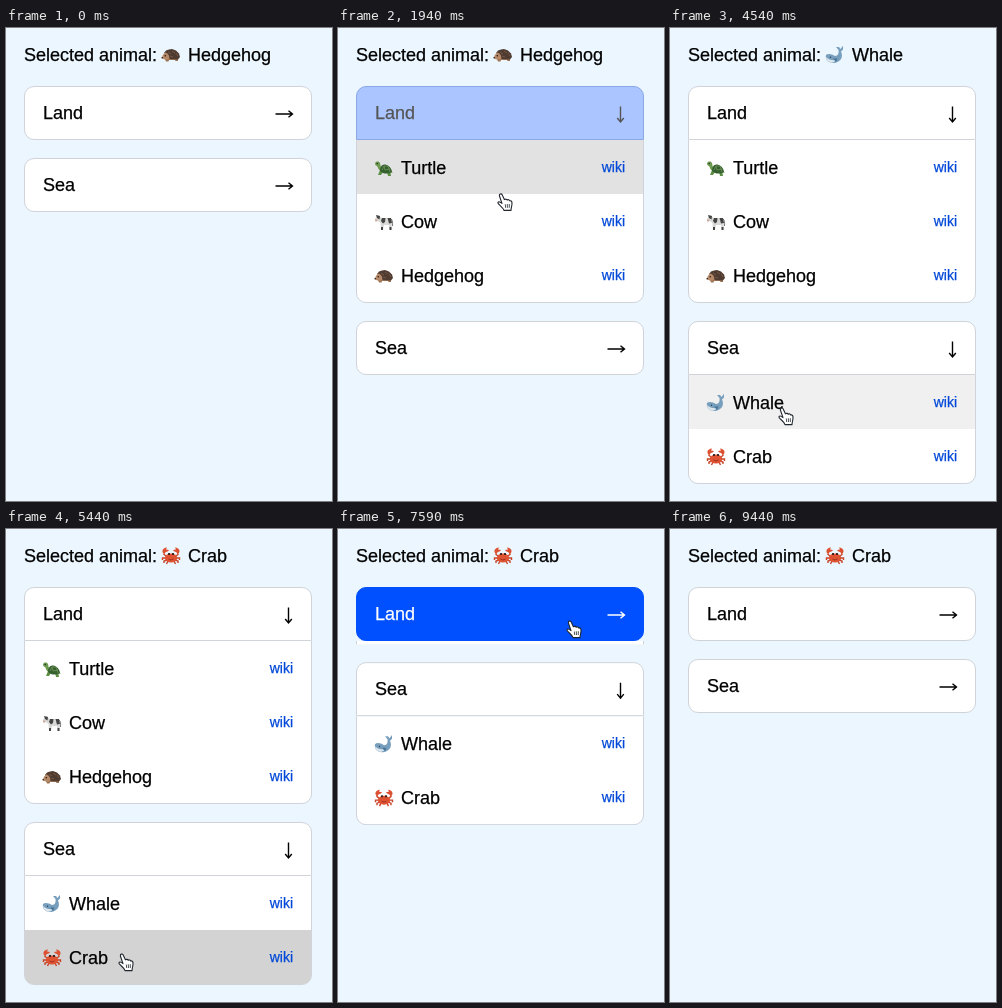
Recreate the animation shown at these times as an HTML page. Size 326 by 473 pixels, loop 9.69 s.

```html
<!DOCTYPE html>
<html lang="en">
<head>
<meta charset="utf-8">
<title>Animal picker</title>
<style>
  html, body { margin: 0; height: 100%; overflow: hidden; background: #ebf6ff; }
  svg { display: block; }
  text { font: 18px "Liberation Sans", Arial, sans-serif; stroke: #000; stroke-width: .25; }
  .wiki { font-size: 14px; fill: #0048d8; stroke: #0048d8; text-anchor: end; }
  .line { fill: none; stroke: #d0d4d9; }
  .arrow { fill: none; stroke-width: 1.4; }
</style>
</head>
<body>
<svg id="stage" width="326" height="473">
  <defs>
    <g id="Turtle">
      <path d="M6 12L4 17H7L9 14M13 13L14 18H17L16 12L19 15" fill="#5d8f45"/>
      <path d="M7 13C4 12 4 9 3 8C.5 7.500 .5 4 3 3.500C6 3 6.500 6 6.500 8L9 11Z" fill="#6c9b50"/>
      <path d="M6 13C6 9 8 6 11 6.500C15 7 18 11 18 14C14 16.500 9 16 6 13Z" fill="#35612f"/>
      <path d="M8 12L10 8L14 8L16 14M11 12L10 8M11 12L16 11" fill="none" stroke="#72945a" stroke-width=".8"/>
      <circle cx="3.200" cy="5.500" r=".7" fill="#222"/>
    </g>
    <g id="Cow">
      <path d="M4 3L8 6H16L18 8L17.500 18H15.500L15 13H10L9 18H7L6.500 11L4 9L1.500 9.500L.8 7Z" fill="#d9d9d7"/>
      <path d="M2 3L6 4L5.500 7.500L3 6ZM8 6H11.500L11 10L9 11.500L7 9ZM13.500 6H17L18 11L15 11.500ZM7 15H9V18H7ZM15.500 15H17.500V18H15.500Z" fill="#444"/>
      <path d="M17 7Q19 8 18.500 14" fill="none" stroke="#555" stroke-width=".8"/>
      <path d="M.8 7.500H3.500L3 9.500H1.300Z" fill="#d3a79e"/>
    </g>
    <g id="Hedgehog">
      <path d="M3 12H17L17 16H14.500L14 15H8L7.500 16.500H5Z" fill="#9b7355"/>
      <path d="M3 8L5 5.500L8 4.500L11 4L15 5.500L18 8.500L19 12L17 14.500L9 14Z" fill="#503b30"/>
      <path d="M7 7L10 9M11 6L14 8M15 8L17 11M9 11L12 12" stroke="#82634f" stroke-width=".7"/>
      <path d="M4 7.500C7 8 9 11 8 14C5 15.500 3 14.500 .7 13Q2 9 4 7.500Z" fill="#b68a68"/>
      <circle cx="4.300" cy="10.800" r=".8" fill="#201916"/>
      <circle cx="1.200" cy="12.700" r=".8" fill="#201916"/>
    </g>
    <g id="Whale">
      <path d="M1 10C3 8 7 9 10 11C13 11 14 8 13.500 5L11 2L14 2L15.500 4L18 .8L18 4.500L16 6.500C18.500 12 16 17 9 18C3 18.500 0 14 1 10Z" fill="#779fbd"/>
      <path d="M1 12C4 15 7 15.500 11 15Q9 18 6 17.700Q1 16 1 12Z" fill="#dde6ed"/>
      <path d="M8 13.500L11 17L12.500 13.500Z" fill="#4b7395"/>
      <circle cx="5.500" cy="12.300" r=".7" fill="#263d50"/>
    </g>
    <g id="Crab">
      <path d="M5 10L2.500 8M15 10L17.500 8M5 12H1.500L1.500 14M15 12H18.500L18.500 14M6 14L3 15V17M14 14L17 15V17M7 15L5.500 18M13 15L14.500 18" fill="none" stroke="#c7442b" stroke-width="1.400"/>
      <path id="claw" d="M3.500 8.500C0 6 1 2 6 1.500L5 3.500L8 4C7.500 6 4 5 3.500 8.500Z" fill="#dc5132"/>
      <use href="#claw" transform="matrix(-1 0 0 1 20 0)"/>
      <ellipse cx="10" cy="12" rx="6.200" ry="4.500" fill="#df5332"/>
      <path d="M8 9V7M12 9V7" stroke="#251817" stroke-width="1.700"/>
      <path d="M7.500 13Q10 15 12.500 13" fill="none" stroke="#8e2a1b" stroke-width=".8"/>
    </g>
  </defs>
  <text x="18" y="33">Selected animal:</text>
  <use id="icon" x="155" y="17"/>
  <text id="choice" x="182" y="33"></text>
  <g id="lists"></g>
  <g id="cursor" fill="#fff" stroke="#20262e" stroke-width="1.100" stroke-linejoin="round">
    <path d="M2.400 3C2 1 4.400 .3 5.300 2.200L7.400 6.800C8.500 6 9.700 6.400 10.200 7.200C11.200 6.500 12.400 7 12.700 8C13.900 7.600 14.800 8.400 15 9.800C15.300 12.600 14.200 14 14 17.600H7C6.400 15 3.400 13.400 1.300 10.900C.3 9.400 1.800 8.400 3.200 9.400L5 10.600Z"/>
    <path d="M8.300 11.500L8.700 15M10.300 11.300L10.500 15M12.300 11.200L12.300 15" fill="none" stroke-width=".8"/>
  </g>
</svg>
<script>
const LOOP = 9690, STEP = 50, SLIDE = 218, ROW = 54, GAP = 18, LEFT = 18, TOP = 58, WIDTH = 288;
const $ = id => document.getElementById(id);
const ease = p => (p = Math.min(1, Math.max(0, p)), p * p * (3 - 2 * p));
const mix = (from, to, p) => from.map((v, i) => v + (to[i] - v) * p);
const rgb = (from, to, p) => `rgb(${mix(from, to, p)})`;

const WHITE = [255, 255, 255], BLACK = [0, 0, 0], BLUE = [0, 80, 255];
const BORDER = [208, 212, 217], GREY = [211, 211, 211];

const groups = [
  { name: "Land", rows: ["Turtle", "Cow", "Hedgehog"], opens: 970, closes: 7190 },
  { name: "Sea", rows: ["Whale", "Crab"], opens: 3310, closes: 8300 }
];
const picks = [[-1000, "Hedgehog"], [2640, "Cow"], [4240, "Whale"], [4840, "Crab"]];

// Pointer moves: start, end, destination.
const moves = [
  [0, 40, 322, 103], [340, 690, 168, 82], [1690, 2060, 156, 192], [2940, 3240, 157, 317],
  [3790, 4190, 108, 379], [4440, 4790, 112, 424], [5740, 6140, 205, 283],
  [6240, 6290, 214, 145], [6340, 6640, 228, 91], [7640, 8040, 222, 150], [8900, 9180, 330, 120]
];
const pointer = t => moves.reduce(
  (pos, [start, end, ...to]) => mix(pos, to, ease((t - start) / (end - start))), [330, 103]);

const full = g => g.rows.length * ROW + 1;
const height = (g, t) => full(g) * (ease((t - g.opens) / SLIDE) - ease((t - g.closes) / SLIDE));
const lastPick = t => picks.filter(p => p[0] <= t).pop();

// Name of the header or row under the fingertip; a fresh click clears the row.
function itemAt(t) {
  const [px, py] = pointer(t), x = px + 4 - LEFT;
  let y = py + 1 - TOP;
  if (x < 0 || x > WIDTH) return;
  for (const g of groups) {
    const h = height(g, t);
    if (y >= 0 && y < ROW) return g.name;
    if (y >= ROW && y < ROW + h) {
      const row = g.rows[Math.floor(y / ROW) - 1], [time, name] = lastPick(t);
      return row === name && t < time + 2 * STEP ? undefined : row;
    }
    y -= ROW + h + GAP;
  }
}

// Hover fades are the average over the last three steps.
const hover = (name, t) => [1, 2, 3].filter(n => itemAt(t - n * STEP) === name).length / 3;

function build(g) {
  const end = full(g) - 1, clip = "clip" + g.name;
  const rows = g.rows.map((name, i) => `<g transform="translate(0 ${i * ROW})">
    <rect class="row" x="1" width="286" height="${ROW}"/>
    <use href="#${name}" x="18" y="18"/>
    <text x="45" y="34">${name}</text><text class="wiki" x="269" y="32">wiki</text></g>`).join("");
  const edge = `M.5 0V${end - 9}a9.5 9.5 0 0 0 9.5 9.5H278a9.5 9.5 0 0 0 9.5 -9.5V0`;
  $("lists").insertAdjacentHTML("beforeend", `<g id="${g.name}">
    <clipPath id="${clip}"><path d="${edge}Z"/></clipPath>
    <svg y="${ROW}" width="${WIDTH}" height="0" overflow="hidden">
      <g clip-path="url(#${clip})">${rows}</g><path class="line" d="${edge}"/></svg>
    <path class="head"/>
    <text class="title" x="19" y="33">${g.name}</text>
    <path class="arrow"/></g>`);
}

function drawGroup(g, t, y) {
  const el = $(g.name), h = height(g, t), lit = hover(g.name, t);
  const set = (part, attrs) => {
    for (const key in attrs) el.querySelector(part).setAttribute(key, attrs[key]);
  };
  const r = 9.5 * (1 - h / full(g)), ink = rgb(BLACK, WHITE, lit);
  el.setAttribute("transform", `translate(${LEFT} ${y})`);
  set("svg", { height: h });
  set(".head", {
    d: `M10 .5H278a9.5 9.5 0 0 1 9.5 9.5V${53.5 - r}a${r} ${r} 0 0 1 ${-r} ${r}
      H${.5 + r}a${r} ${r} 0 0 1 ${-r} ${-r}V10a9.5 9.5 0 0 1 9.5 -9.5Z`,
    fill: rgb(WHITE, BLUE, lit),
    stroke: rgb(BORDER, BLUE, lit)
  });
  set(".title", { fill: ink, style: `stroke:${ink}` });
  set(".arrow", {
    stroke: ink,
    d: t > g.opens && t <= g.closes
      ? "M264.5 20.5V36M261.2 32L264.5 36L267.8 32"
      : "M251.5 28H268.5M264.5 24.7L268.5 28L264.5 31.3"
  });
  el.querySelectorAll(".row").forEach((row, i) =>
    row.setAttribute("fill", rgb(WHITE, GREY, hover(g.rows[i], t))));
  return y + ROW + h + GAP;
}

// The picture advances in steps and rests once as the second list opens.
function storyTime(ms) {
  const t = ms < 40 ? 0 : 40 + STEP * Math.floor((ms - 40) / STEP);
  return t < 3590 ? Math.min(t, 3340) : t - 200;
}

function draw(ms) {
  const t = storyTime(ms), name = lastPick(t)[1];
  $("choice").textContent = name;
  $("icon").setAttribute("href", "#" + name);
  groups.reduce((y, g) => drawGroup(g, t, y), TOP);
  $("cursor").setAttribute("transform", `translate(${pointer(t)})`);
}

groups.forEach(build);
const start = performance.now();
function tick() {
  draw((performance.now() - start) % LOOP);
  requestAnimationFrame(tick);
}
tick();
</script>
</body>
</html>
```
